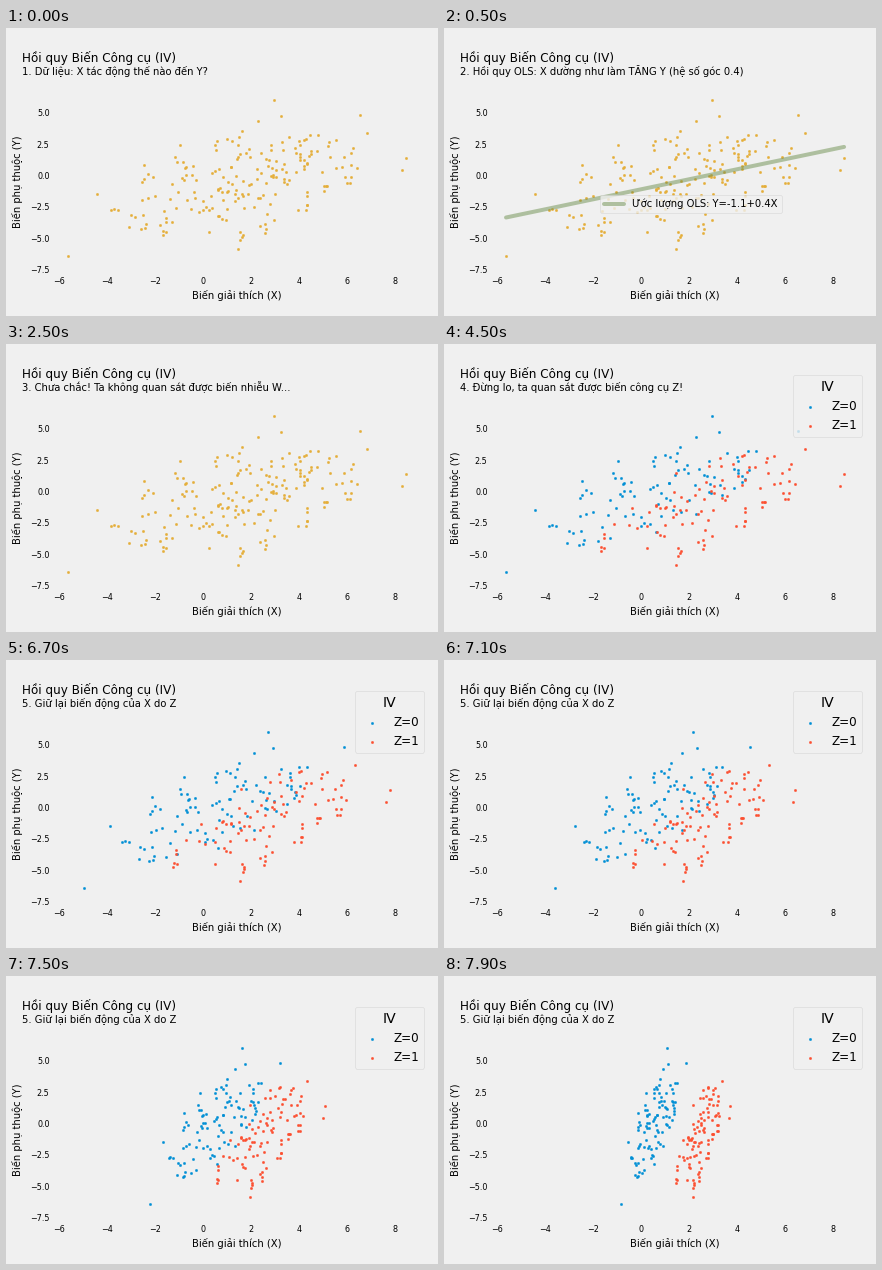
Recreate the animation shown at these times as a matplotlib script. Size 432 px wide and 288 px high, loop 8 s.

```python
import matplotlib.pyplot as plt
import numpy as np
from matplotlib.animation import FuncAnimation

W, H, DPI = 432, 288, 72
FRAMES, INTERVAL = 80, 100
BACKGROUND, GOLD, BLUE, RED, GREEN = "#f0f0f0", "#e5ae38", "#008fd5", "#fc4f30", "#6d904f"

plt.rcParams.update({
    "font.family": "DejaVu Sans",
    "figure.facecolor": BACKGROUND,
    "axes.facecolor": BACKGROUND,
    "patch.linewidth": 0.5,
})

# Start time in ms and the caption shown from then on.
CAPTIONS = [
    (0, "1. Dữ liệu: X tác động thế nào đến Y?"),
    (500, "2. Hồi quy OLS: X dường như làm TĂNG Y (hệ số góc 0.4)"),
    (2500, "3. Chưa chắc! Ta không quan sát được biến nhiễu W..."),
    (4500, "4. Đừng lo, ta quan sát được biến công cụ Z!"),
    (6500, "5. Giữ lại biến động của X do Z"),
]
SHRINK_START, STEP_MS, SHRINK_STEPS = 6500, 200, 9

# Within a group, Y rises with X; the higher group lies right of and below the other.
SPREAD_X, SPREAD_Y, SLOPE = 2.2, 1.7, 0.61
MEANS = [(0.54, 0.23), (2.36, -1.27)]
EXTREMES = [
    [(-5.61, -6.42), (-4.4, -1.45), (2.95, 6.0), (6.53, 4.78)],
    [(8.44, 1.39), (8.27, 0.43), (6.82, 3.38), (1.45, -5.86)],
]


def make_group(rng, mean, extremes, count=96):
    """Bounded random cloud of unit variance, stretched and sheared."""
    radius = 2.1 * rng.random(count) ** 0.6
    angle = rng.uniform(0, 2 * np.pi, count)
    dx = SPREAD_X * radius * np.cos(angle)
    dy = SPREAD_Y * radius * np.sin(angle) + SLOPE * dx
    return np.vstack([extremes, np.column_stack([mean[0] + dx, mean[1] + dy])])


rng = np.random.default_rng(7)
GROUPS = [make_group(rng, mean, extremes) for mean, extremes in zip(MEANS, EXTREMES)]

fig = plt.figure(figsize=(W / DPI, H / DPI), dpi=DPI)

# Axes box in pixels, measured from the top left, and its data scale.
LEFT, TOP, RIGHT, BOTTOM = 47, 31, 424, 245.5
ZERO_X, ZERO_Y, UNIT_X, UNIT_Y = 197, 147.5, 24.06, 12.56

ax = fig.add_axes([LEFT / W, 1 - BOTTOM / H, (RIGHT - LEFT) / W, (BOTTOM - TOP) / H])
ax.set_xlim((LEFT - ZERO_X) / UNIT_X, (RIGHT - ZERO_X) / UNIT_X)
ax.set_ylim((ZERO_Y - BOTTOM) / UNIT_Y, (ZERO_Y - TOP) / UNIT_Y)
ax.set_xticks(range(-6, 9, 2))
ax.set_yticks(np.arange(-7.5, 5.1, 2.5))
ax.tick_params(length=0, pad=3.5, labelsize=8)
ax.spines[:].set_visible(False)


def label(x, y, text, size, **kwargs):
    return fig.text(x / W, 1 - y / H, text, fontsize=size, **kwargs)


label(16, 34, "Hồi quy Biến Công cụ (IV)", 12)
caption = label(16, 47, "", 10)
label(230.5, 271, "Biến giải thích (X)", 10, ha="center")
label(17, 153.5, "Biến phụ thuộc (Y)", 10, rotation=90, ha="right", va="center",
      rotation_mode="default")


def scatter(points, color, name=None):
    return ax.scatter(points[:, 0], points[:, 1], s=5, color=color, label=name)


def legend(handles, loc, x, y, size, **kwargs):
    return ax.legend(handles=handles, loc=loc, bbox_to_anchor=(x / W, 1 - y / H),
                     bbox_transform=fig.transFigure, borderaxespad=0,
                     fontsize=size, **kwargs)


all_dots = scatter(np.vstack(GROUPS), GOLD)
group_dots = [scatter(points, color, f"Z={z}")
              for z, (points, color) in enumerate(zip(GROUPS, (BLUE, RED)))]
line_x = np.array([-5.61, 8.44])
fit_line, = ax.plot(line_x, -1.1 + 0.4 * line_x, color=GREEN, alpha=0.5, lw=4,
                    solid_capstyle="round", label="Ước lượng OLS: Y=-1.1+0.4X")

fit_legend = legend([fit_line], "center", 247, 176, 10)
group_legend = legend(group_dots, "upper right", 418, 31, 12,
                      title="IV", title_fontsize=14)
ax.add_artist(fit_legend)  # the second legend call dropped it from the axes


def draw(frame):
    time = frame * INTERVAL
    scene = sum(time >= start for start, _ in CAPTIONS) - 1
    caption.set_text(CAPTIONS[scene][1])

    grouped = scene >= 3
    all_dots.set_visible(not grouped)
    for artist in (fit_line, fit_legend):
        artist.set_visible(scene == 1)
    for artist in (*group_dots, group_legend):
        artist.set_visible(grouped)

    # Each group closes in on its own mean in even steps.
    step = max(0, (time - SHRINK_START) // STEP_MS)
    keep = 1 - step / SHRINK_STEPS
    for dots, points, (mean_x, _) in zip(group_dots, GROUPS, MEANS):
        x = mean_x + (points[:, 0] - mean_x) * keep
        dots.set_offsets(np.column_stack([x, points[:, 1]]))
    return []


anim = FuncAnimation(fig, draw, frames=FRAMES, interval=INTERVAL, repeat=True)
plt.show()
```
